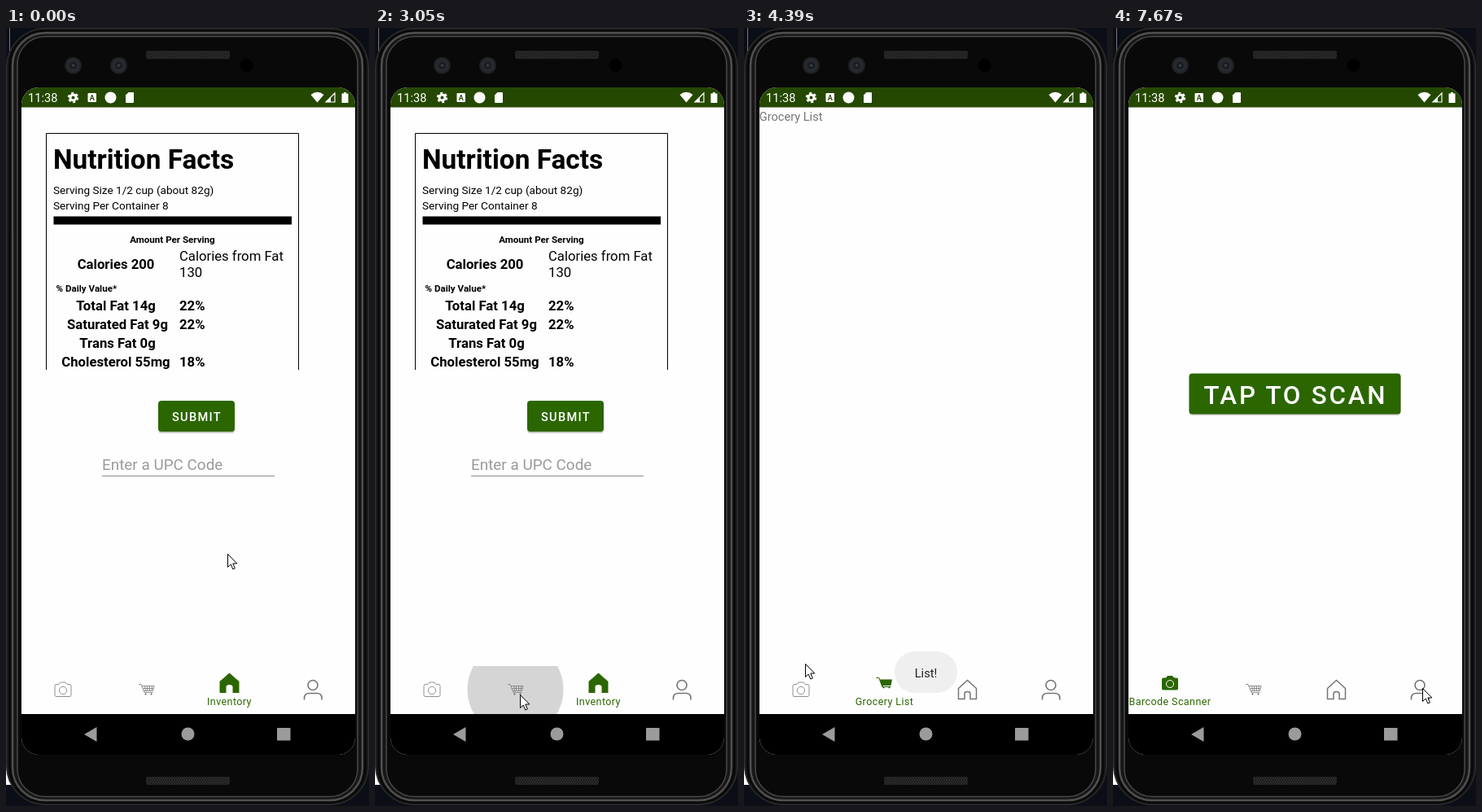
Write an HTML page that moves like this. It is 446 px wide and 956 px high and loops after 8000 ms.

```html
<!DOCTYPE html>
<html lang="en">
<head>
<meta charset="utf-8">
<title>Pantry app</title>
<style>
  html, body { margin: 0; width: 100%; height: 100%; overflow: hidden; background: #0b0e17; }
  svg { display: block; width: 100%; height: 100%; font-family: Roboto, sans-serif; font-size: 16.69px; }
  .b { font-weight: 700; }
  .tiny { font-size: 11.6px; font-weight: 700; }
  .small { font-size: 13.6px; }
  .body { font-size: 14.6px; }
  .mid { text-anchor: middle; }
  .btn { fill: #fff; font-weight: 500; letter-spacing: .0892em; }
  .nav text { font-size: 12.5px; letter-spacing: .0333em; text-anchor: middle; fill: #666; }
  .line { fill: none; stroke: #747474; }
  .fine { stroke: #858585; stroke-width: .9; }
  .solid, .nav .on text { fill: #2b6600; }
  .nav .on .line, .nav g:not(.on) > g > .solid { display: none; }
</style>
</head>
<body>
<svg viewBox="0 0 446 956" preserveAspectRatio="none">
  <defs>
    <clipPath id="screen"><rect x="19" y="73" width="410" height="820" rx="21"/></clipPath>
    <clipPath id="tabs"><path d="M19 784h410v59H19z"/></clipPath>
    <pattern id="mesh" width="3" height="4" patternUnits="userSpaceOnUse">
      <rect width="3" height="4" fill="#151515"/><path d="M0 0L3 4M3 0L0 4" stroke="#353535" stroke-width=".8"/>
    </pattern>
    <radialGradient id="lens">
      <stop offset="0" stop-color="#4b4f57"/><stop offset=".25" stop-color="#15181d"/>
      <stop offset=".6" stop-color="#292c31"/><stop offset="1" stop-color="#1b1d20"/>
    </radialGradient>
    <path id="camera" d="M-8-6.500h3l2-2.500h6l2 2.500h3q2 0 2 2v11q0 2-2 2H-8q-2 0-2-2v-11q0-2 2-2z"/>
  </defs>

  <rect width="446" height="956" fill="#0b0e17"/>
  <path d="M0 900h12v30H0z" fill="#fff"/>
  <path d="M4.500 0v40" stroke="#777"/>
  <g id="bezel"></g>
  <rect x="172" y="28" width="103" height="10" rx="2" fill="url(#mesh)"/>
  <rect x="172" y="920" width="103" height="10" rx="2" fill="url(#mesh)"/>
  <circle cx="82.500" cy="46" r="10.500" fill="url(#lens)"/>
  <circle cx="138.500" cy="46" r="10.500" fill="url(#lens)"/>
  <circle cx="295.500" cy="46" r="8" fill="#000"/>

  <g clip-path="url(#screen)">
    <path d="M19 73h410v820H19z" fill="#fefefe"/>
    <path d="M19 73h410v24.500H19z" fill="#254800"/>
    <g fill="#fff">
      <text class="body" x="27" y="91">11:38</text>
      <circle cx="82.500" cy="85.500" r="3.500" fill="none" stroke="#fff" stroke-width="3"/>
      <circle cx="82.500" cy="85.500" r="5.700" fill="none" stroke="#fff" stroke-width="2" stroke-dasharray="3 2.970"/>
      <rect x="100.500" y="80" width="10.500" height="11" rx="1"/>
      <text class="mid" x="105.800" y="88.800" style="font-size:9px;font-weight:700;fill:#254800">A</text>
      <circle cx="128.500" cy="85.500" r="7"/>
      <path d="M150.500 79h5.500q1 0 1 1v11q0 1-1 1h-8q-1 0-1-1v-8.500z"/>
      <path d="M374.500 82q8-6.500 16 0l-8 9.500z"/>
      <path d="M404 80v11h-11z" fill="none" stroke="#fff" stroke-width="1.200"/>
      <path d="M399 85v6h-6z"/>
      <path d="M415 79h3v1.500h2.500V92h-8V80.500h2.500z"/>
    </g>

    <g data-page="facts">
      <path d="M49.500 420V129.500h310V420" fill="none" stroke="#000"/>
      <text class="b" x="58" y="173" style="font-size:33.4px">Nutrition Facts</text>
      <text class="small" x="58" y="203.500">Serving Size 1/2 cup (about 82g)</text>
      <text class="small" x="58" y="222.500">Serving Per Container 8</text>
      <path d="M58.500 231.500H351v10H58.500z"/>
      <text class="tiny mid" x="204.500" y="264">Amount Per Serving</text>
      <text class="b mid" x="135" y="296">Calories 200</text>
      <text x="213" y="286">Calories from Fat</text>
      <text x="213" y="306">130</text>
      <text class="tiny" x="61.500" y="324">% Daily Value*</text>
      <g id="nutrients" class="b"></g>
      <rect x="187" y="460" width="94" height="38" rx="4" opacity=".2"/>
      <rect x="187" y="458" width="94" height="38" rx="4" class="solid"/>
      <text class="btn body" x="204" y="483">SUBMIT</text>
      <text x="118" y="543" fill="#9a9a9a" style="font-size:18.9px">Enter a UPC Code</text>
      <path d="M118 550.500h212" stroke="#8c8c8c"/>
    </g>
    <g data-page="list"><text class="body" x="18.700" y="113.500" fill="#757575">Grocery List</text></g>
    <g data-page="scan">
      <rect x="93.500" y="426" width="260" height="50" rx="4" opacity=".2"/>
      <rect x="93.500" y="424.500" width="260" height="50" rx="4" class="solid"/>
      <text class="btn" x="111.400" y="462" style="font-size:31.3px">TAP TO SCAN</text>
    </g>

    <g clip-path="url(#tabs)"><circle id="ripple" cx="172.500" cy="813"/></g>
    <g class="nav">
      <g data-tab="scan">
        <g>
          <use href="#camera" class="line fine"/>
          <circle class="line fine" cy="1" r="4.700"/>
          <use href="#camera" class="solid"/>
          <circle class="solid" cy="1" r="4.500" stroke="#fff"/>
        </g>
        <text x="70" y="832">Barcode Scanner</text>
      </g>
      <g data-tab="list">
        <g>
          <path class="line fine" d="M-9.500-6.500h3l4 10H8M-5.500-4.500h15l-1.500 6H-3.500M-4-1.500H8.500M-2-4.500l1 6M1-4.500v6M4-4.500v6M7-4.500l-.5 6"/>
          <path class="solid" d="M-10-7h3.500l1.200 2.500H9.500L8 3H-2l.300 1H8v1H-3L-7-6h-3z"/>
          <circle cx="-1" cy="5.500" r="1" fill="#555"/><circle cx="6" cy="5.500" r="1" fill="#555"/>
        </g>
        <text x="172.500" y="832">Grocery List</text>
      </g>
      <g data-tab="facts">
        <g>
          <path class="line" stroke-width="1.500" d="M-11-1.500L0-11.500 11-1.500V11.500H3.500V5Q3.500 2.500 0 2.500T-3.500 5v6.500H-11z"/>
          <path class="solid" d="M-12-2L0-12.500 12-2V12H4V4.500Q4 2 0 2T-4 4.500V12h-8z"/>
        </g>
        <text x="274.500" y="832">Inventory</text>
      </g>
      <g class="line" stroke-width="1.600">
        <circle cx="377" cy="807.500" r="6"/><path d="M366.500 825.500v-2q0-6 6-6h9.500q6 0 6 6v2"/>
      </g>
    </g>

    <g id="toast">
      <rect y="766" height="51" rx="25" fill="#efefef"/>
      <text class="body mid" x="223.500" y="797.500" fill="#222"></text>
    </g>
    <path d="M19 843h410v50H19z"/>
    <g fill="#9b9b9b">
      <path d="M96 868l15.500-9v18z"/><circle cx="223.500" cy="867.500" r="8"/>
      <path d="M333 860h16.500v15.500H333z"/>
    </g>
  </g>
  <path id="cursor" d="M.500.500v16l3.700-3.500 2.600 6 2.600-1.100-2.600-5.900h5z" fill="#fff" stroke="#000"/>
</svg>

<script>
const LOOP = 8000, STEP = 120;
const LIST_AT = 3170, SCAN_AT = 5240;
const $ = q => document.querySelector(q);
const all = q => [...document.querySelectorAll(q)];
const ramp = (t, from, to) => Math.min(1, Math.max(0, (t - from) / (to - from)));

// Pointer legs: start time, number of steps, destination.
const legs = [
  [0, 1, 272, 646], [1100, 3, 255, 662], [1500, 3, 370, 793], [1900, 4, 178, 819],
  [3340, 3, 199, 441], [3730, 3, 107, 303], [4120, 1, 83, 657], [4270, 2, 75, 781],
  [4540, 1, 72, 811], [SCAN_AT, 1, 282, 364], [6190, 4, 198, 492], [6710, 1, 268, 443],
  [6830, 1, 236, 518], [6980, 1, 252, 667], [7130, 1, 336, 807], [7280, 4, 380, 811]
];

function pointerAt(t) {
  const i = legs.findLastIndex(leg => leg[0] <= t);
  const [start, steps, x, y] = legs[i];
  const [, , x0, y0] = legs[Math.max(0, i - 1)];
  const k = Math.min(1, (Math.floor((t - start) / STEP) + 1) / steps);
  return [x0 + (x - x0) * k, y0 + (y - y0) * k].map(Math.round);
}

// Nested rims, from the outer edge inwards.
const rim = (inset, fill, stroke, width = 1) =>
  `<rect x="${inset}" y="${inset * .75}" width="${446 - 2 * inset}" height="${955 - 1.5 * inset}"
    rx="${48 - inset}" fill="${fill}" stroke="${stroke}" stroke-width="${width}"/>`;
$('#bezel').innerHTML = rim(.5, '#1c1c1c', '#333') + rim(4, '#0a0a0a', '#0a0a0a', 2)
  + rim(8, '#161616', '#505050', 2.5) + rim(14, '#090909', '#484848', 1.5);

const nutrients = [
  ['Total Fat 14g', '22%'], ['Saturated Fat 9g', '22%'], ['Trans Fat 0g', ''], ['Cholesterol 55mg', '18%']
];
$('#nutrients').innerHTML = nutrients.map(([name, share], i) => {
  const y = 346.5 + 23.2 * i;
  return `<text class="mid" x="${i % 3 ? 137 : 135}" y="${y}">${name}</text><text x="213" y="${y}">${share}</text>`;
}).join('');

const cursor = $('#cursor'), ripple = $('#ripple'), toast = $('#toast');
const pages = all('[data-page]');
const tabs = all('[data-tab]').map(el => {
  const [icon, label] = el.children;
  return { el, icon, label, name: el.dataset.tab, x: label.getAttribute('x') };
});

function drawTabs(t, page) {
  const slide = ramp(t, LIST_AT, LIST_AT + 290);
  const lift = {
    facts: page === 'scan' ? 0 : 1 - slide,
    list: page === 'list' ? slide : 0,
    scan: page === 'scan' ? 1 : 0
  };
  tabs.forEach(({ el, icon, label, name, x }) => {
    el.classList.toggle('on', name === page);
    icon.setAttribute('transform', `translate(${x} ${813 - 8 * lift[name]})`);
    label.style.opacity = lift[name];
  });
}

function drawToast(t, page) {
  const [text, width] = page === 'scan' ? ['Scanner!', 107] : ['List!', 77];
  const [box, label] = toast.children;
  box.setAttribute('x', 223.5 - width / 2);
  box.setAttribute('width', width);
  label.textContent = text;
  toast.style.opacity = page === 'scan'
    ? 1 - ramp(t, 7150, 7650)
    : ramp(t, LIST_AT - 40, 3580) - ramp(t, 4840, SCAN_AT);
}

function draw(t) {
  const page = t < LIST_AT ? 'facts' : t < SCAN_AT ? 'list' : 'scan';
  pages.forEach(p => p.style.display = p.dataset.page === page ? '' : 'none');
  drawTabs(t, page);
  drawToast(t, page);
  ripple.setAttribute('r', 55 + 4 * ramp(t, 2910, 3050));
  ripple.style.opacity = t < 2910 ? 0 : .16 * (1 - ramp(t, 3200, 3560));
  cursor.setAttribute('transform', `translate(${pointerAt(t)})`);
}

const start = performance.now();
function tick() {
  draw((performance.now() - start) % LOOP);
  requestAnimationFrame(tick);
}
tick();
</script>
</body>
</html>
```
